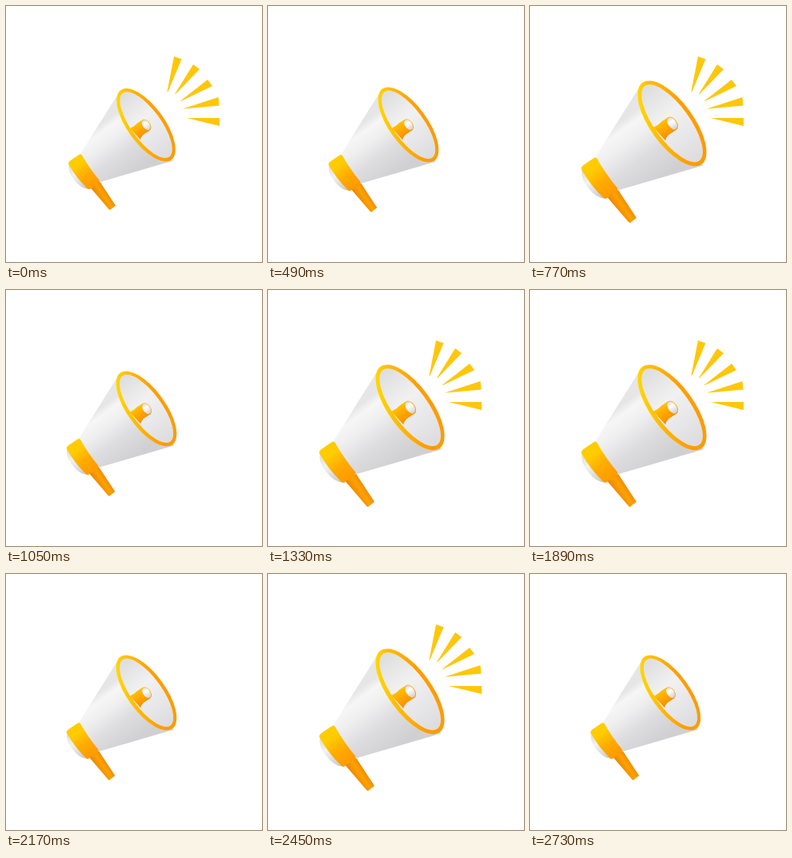
Animation of 320 by 320 pixels, one loop 2.8 s. Source, as an HTML page with a canvas:

```html
<!DOCTYPE html>
<html lang="en">
<head>
<meta charset="utf-8">
<title>Megaphone</title>
<style>
html, body { margin: 0; width: 100%; height: 100%; overflow: hidden; background: #fff; }
canvas { display: block; width: 320px; height: 320px; }
</style>
</head>
<body>
<canvas id="stage" width="320" height="320"></canvas>
<script>
const ctx = document.getElementById('stage').getContext('2d');
const STEP = 70, STEPS = 8, CENTER = 160;
const TILT = 54 * Math.PI / 180;

// Each ray: tip, then the two outer corners.
const RAYS = [
  [202, 107, 210, 63, 219.5, 66.5],
  [211.5, 110, 234, 73, 242, 79],
  [218, 119, 252, 92, 258, 100],
  [221.5, 128.5, 265.5, 114, 266.5, 124.5],
  [223.5, 139.5, 267, 140, 267, 150]
];

function gradient(x0, y0, x1, y1, stops) {
  const g = ctx.createLinearGradient(x0, y0, x1, y1);
  stops.forEach(([at, color]) => g.addColorStop(at, color));
  return g;
}

const RIM = gradient(139, 150, 212, 140, [[0, '#ffdc00'], [0.25, '#ffbe00'], [0.6, '#ff9f00'], [1, '#ff9900']]);
const INSIDE = gradient(145, 112, 205, 187, [[0, '#dededf'], [0.4, '#f1f1f2'], [0.7, '#e7e7e9'], [1, '#dcdcde']]);
const CONE = gradient(117, 149, 160, 208, [[0, '#e6e6e7'], [0.12, '#f6f6f6'], [0.32, '#efeff0'], [0.62, '#dddddf'], [1, '#d0d0d2']]);
const BAND = gradient(84, 189, 112, 226, [[0, '#ffcc00'], [0.25, '#ffcc00'], [0.6, '#ffaa00'], [1, '#ff9800']]);
const CAP = gradient(79, 200, 100, 229, [[0, '#dededf'], [0.35, '#f2f2f2'], [1, '#cacacd']]);
const HANDLE = gradient(115, 243, 127, 235, [[0, '#dd8000'], [0.3, '#f39200'], [0.65, '#fda200'], [1, '#ee9000']]);
const PLUG = gradient(161, 145, 173, 162, [[0, '#ffcc00'], [0.4, '#ffb000'], [1, '#f78f00']]);
const PLUG_FACE = gradient(171, 143, 178, 154, [[0, '#d8d8da'], [0.4, '#ffffff'], [1, '#d5d5d8']]);

function fillPath(path, fill) {
  ctx.fillStyle = fill;
  ctx.fill(new Path2D(path));
}

function ellipse(x, y, a, b, fill) {
  ctx.beginPath();
  ctx.ellipse(x, y, a, b, TILT, 0, Math.PI * 2);
  ctx.fillStyle = fill;
  ctx.fill();
}

function drawMegaphone() {
  fillPath('M105.5 227 L117 219 L137 249.5 L130 255 L128.5 254 Z', HANDLE);
  fillPath('M79 197 Q76.5 207 85 217 Q94 229 104 229 Z', CAP);
  fillPath('M138.8 112 L93 185 L116 220.5 L208.5 193.5 Z', CONE);
  fillPath('M78.3 198 Q77.5 195.5 80 193.5 L91.5 185.7 Q93.5 184.5 95 186.5 Q105 204 116.5 217.5 Q117.6 219.5 116 220.8 L105 228.8 Q103 229.5 101.5 228 Q88 215 78.3 198 Z', BAND);
  ellipse(175, 148.7, 53.8, 23.1, RIM);
  ellipse(175.1, 148.6, 49.4, 18.7, INSIDE);
  fillPath('M155 153 Q161 150 164 146.5 L170.4 142.4 L179.8 155.4 L172 160.5 Q168.5 163.5 168 167 Z', PLUG);
  ellipse(175.1, 148.9, 8, 5.2, PLUG);
  ellipse(175.2, 148.8, 7, 4.3, PLUG_FACE);
}

function drawRays() {
  ctx.fillStyle = '#ffc70a';
  for (const [x0, y0, x1, y1, x2, y2] of RAYS) {
    ctx.beginPath();
    ctx.moveTo(x0 - 0.5, y0);
    ctx.lineTo(x1, y1);
    ctx.lineTo(x2, y2);
    ctx.lineTo(x0 + 0.5, y0);
    ctx.fill();
  }
}

function render(now) {
  const phase = Math.floor(now / STEP) % STEPS;
  const scale = 1 + 0.1 * (1 - Math.cos(phase / STEPS * Math.PI * 2));
  ctx.fillStyle = '#fff';
  ctx.fillRect(0, 0, 320, 320);
  if (phase < STEPS / 2) drawRays();
  ctx.save();
  ctx.translate(CENTER, CENTER);
  ctx.scale(scale, scale);
  ctx.translate(-CENTER, -CENTER);
  drawMegaphone();
  ctx.restore();
}

const start = performance.now();
function tick() {
  render(performance.now() - start);
  requestAnimationFrame(tick);
}
tick();
</script>
</body>
</html>
```
